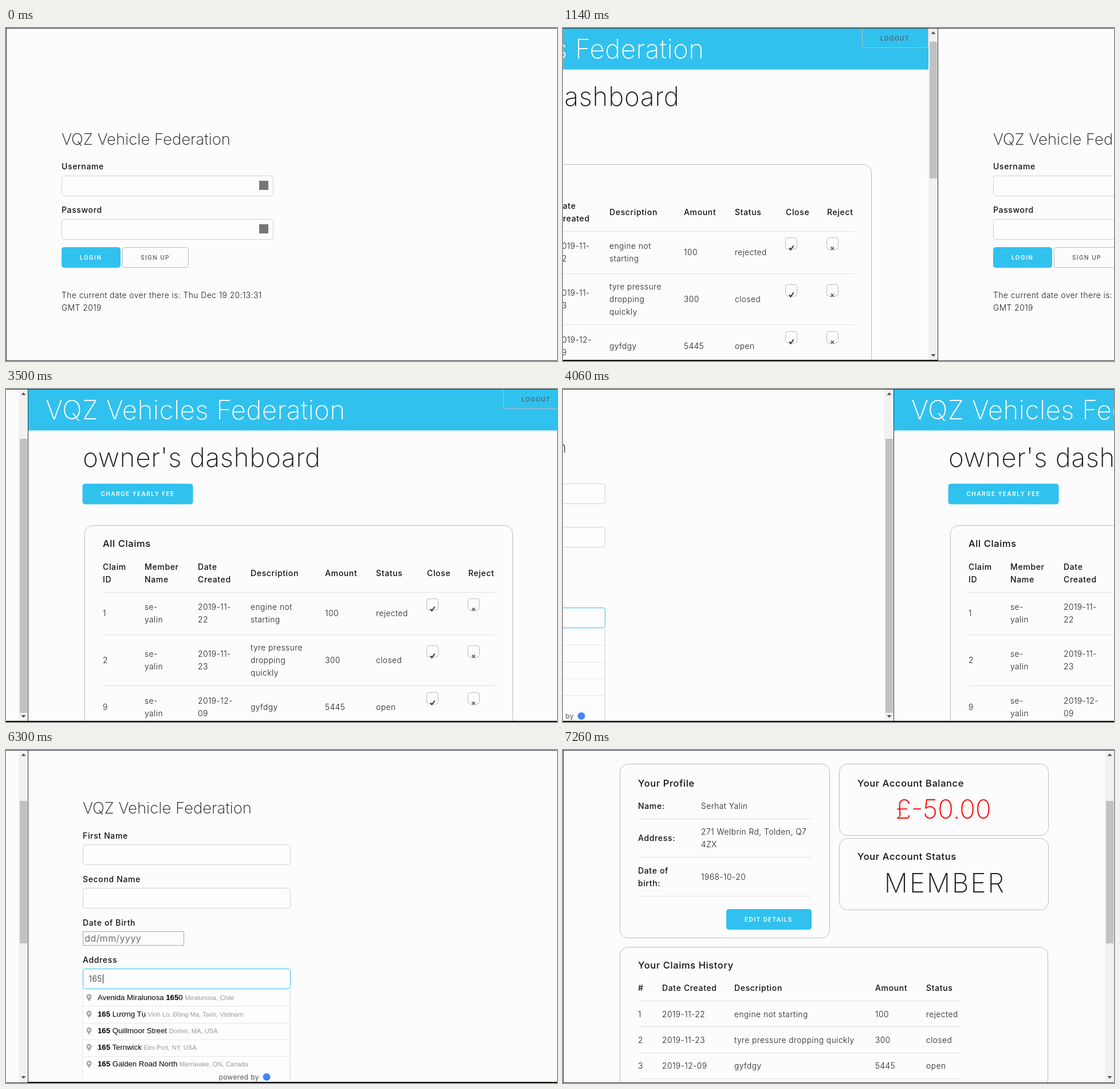
An HTML page for the animation above (8000 ms loop, 962x582 px).

```html
<!DOCTYPE html>
<html lang="en">
<head>
<meta charset="utf-8">
<title>Members portal</title>
<style>
  html, body { margin: 0; width: 100%; height: 100%; overflow: hidden; background: #fcfcfc; }
  svg { display: block; width: 962px; height: 582px; }
  text { font-family: Inter, Lato, sans-serif; fill: #1c1c1c; }
  .body { font-size: 13.8px; font-weight: 300; letter-spacing: .47px; }
  .label { font-size: 14px; font-weight: 500; letter-spacing: .65px; fill: #111; }
  .sub { font-size: 16.5px; font-weight: 500; letter-spacing: .6px; fill: #111; }
  .title { font-size: 27.5px; font-weight: 250; letter-spacing: 0; }
  .big { font-size: 45.8px; font-weight: 250; letter-spacing: .7px; }
  .hero { letter-spacing: .4px; }
  .white { fill: #fff; }
  .status { letter-spacing: 3px; text-anchor: middle; }
  .debt { letter-spacing: 0; fill: #f00; text-anchor: middle; }
  .btn { font-size: 10.1px; font-weight: 500; letter-spacing: 1.4px; fill: #555; }
  .btn.white { font-weight: 600; fill: #fff; }
  .date { font-size: 15.8px; font-weight: 300; letter-spacing: .6px; fill: #444; }
  .place { font: 13.2px "Liberation Sans", Arial, sans-serif; fill: #000; }
  .place .bold { font-weight: 700; }
  .place .area { font-size: 11.2px; fill: #999; }
  .credit { font-size: 12px; letter-spacing: .35px; fill: #555; }
</style>
</head>
<body>
<svg id="stage" viewBox="0 0 962 582"></svg>
<script>
const W = 962, H = 582, LOOP = 8000, STEP = 40, STEPS = 25;
const STARTS = [500, 3500, 6300];
const BLUE = '#31c1ef', DARK = '#2c3135', PAPER = '#fcfcfc', LINE = 22;

const rect = (x, y, w, h, fill) =>
  `<rect x="${x}" y="${y}" width="${w}" height="${h}" fill="${fill}"/>`;
const box = (x, y, w, h, r, stroke, fill = 'none') =>
  `<rect x="${x + .5}" y="${y + .5}" width="${w - 1}" height="${h - 1}" rx="${r}" fill="${fill}" stroke="${stroke}"/>`;
const path = (d, fill, stroke = 'none', width = 1) =>
  `<path d="${d}" fill="${fill}" stroke="${stroke}" stroke-width="${width}"/>`;
const text = (x, y, str, cls = 'body') =>
  `<text x="${x}" y="${y}" class="${cls}">${str}</text>`;

// Lines are centred around the baseline y.
const cell = (x, y, str, cls) => {
  const lines = str.split('|');
  const top = y - (lines.length - 1) * LINE / 2;
  return lines.map((s, i) => text(x, top + i * LINE, s, cls)).join('');
};
const row = (cols, y, cells, cls) => cells.map((s, i) => cell(cols[i], y, s, cls)).join('');
const rules = (x, w, ys) => ys.map(y => rect(x, y, w, 1, '#e1e1e1')).join('');

const input = (x, y, w, stroke = '#d1d1d1') => box(x, y, w, 36, 4, stroke, '#fdfdfd');
const card = (x, y, w, h) => box(x, y, w, h, 14, '#bbb', PAPER);
const button = (x, y, w, str, solid) =>
  box(x, y, w, 36, 4, solid ? BLUE : '#bbb', solid ? BLUE : 'none') +
  text(x + 32, y + 21.5, str, solid ? 'btn white' : 'btn');

const scrollbar = (top, bottom) =>
  rect(946, 1, 16, 580, '#f1f1f1') + rect(948, top, 13, bottom - top, '#c1c1c1') +
  path('M950.5 10.5l4-4.5 4 4.5z', '#505050') + path('M950.5 570l4 4.5 4-4.5z', '#505050');

const page = (id, body, foot) =>
  `<g id="${id}">` + rect(0, 0, W, H, PAPER) + body +
  rect(0, 0, W, 1, DARK) + rect(0, 0, 1, H, DARK) +
  rect(0, H - foot, W, foot, foot > 1 ? '#0c0d0e' : DARK) + '</g>';

function login() {
  const field = (y, name) => text(97, y, name, 'label') + input(97, y + 11, 370) +
    rect(442, y + 20, 16, 16, '#777');
  return text(97, 204, 'VQZ Vehicle Federation', 'title') +
    field(247, 'Username') + field(323, 'Password') +
    button(97, 383, 103, 'LOGIN', true) + button(203, 383, 116, 'SIGN UP') +
    text(97, 472, 'The current date over there is: Thu Dec 19 20:13:31') +
    text(97, 494, 'GMT 2019');
}

function dashboard() {
  const cols = [131, 204, 297, 389, 519, 608, 697, 769];
  const tools = y =>
    box(696, y, 21, 21, 4, '#bbb') + box(768, y, 21, 21, 4, '#bbb') +
    path(`M703 ${y + 18.5}l2.5 3 5-7`, 'none', '#333', 2) +
    path(`M775.5 ${y + 16.5}l5.5 5.5m0-5.5l-5.5 5.5`, 'none', '#444', 1.3);
  return rect(0, 0, 946, 72.5, BLUE) +
    text(31, 53, 'VQZ Vehicles Federation', 'big hero white') +
    box(830, -2, 116, 37, 4, '#bbb') + text(862, 21.5, 'LOGOUT', 'btn') +
    text(96, 136, "owner's dashboard", 'big') +
    button(95.5, 165.5, 193, 'CHARGE YEARLY FEE', true) +
    card(99, 238, 748, 400) + text(131, 276, 'All Claims', 'sub') +
    row(cols, 327, ['Claim|ID', 'Member|Name', 'Date|Created', 'Description',
      'Amount', 'Status', 'Close', 'Reject'], 'label') +
    rules(131, 685, [355, 429, 518]) +
    row(cols, 397, ['1', 'se-|yalin', '2019-11-|22', 'engine not|starting', '100', 'rejected']) +
    row(cols, 479, ['2', 'se-|yalin', '2019-11-|23', 'tyre pressure|dropping|quickly', '300', 'closed']) +
    row(cols, 561, ['9', 'se-|yalin', '2019-12-|09', 'gyfdgy', '5445', 'open']) +
    [366, 448, 530].map(tools).join('') + scrollbar(24, 263);
}

function signup() {
  const x = 96;
  const places = [
    ['Avenida Miralunosa ', '165', '0', 'Miralunosa, Chile'],
    ['', '165', ' Lương Tụ', 'Vinh Lo, Đồng Mạ, Tarin, Vietnam'],
    ['', '165', ' Quillmoor Street', 'Dorlen, MA, USA'],
    ['', '165', ' Ternwick', 'Elm Port, NY, USA'],
    ['', '165', ' Galden Road North', 'Merriwake, ON, Canada']
  ];
  const place = ([before, hit, after, area], i) => {
    const y = 437 + i * 29.1;
    return path(`M107 ${y + 3}c-1-4-4.5-5-4.5-9a4.5 4.5 0 0 1 9 0c0 4-3.5 5-4.5 9z`, '#aaa') +
      `<circle cx="107" cy="${y - 6}" r="1.6" fill="#fff"/>` +
      text(122, y, `${before}<tspan class="bold">${hit}</tspan>${after} <tspan class="area">${area}</tspan>`, 'place');
  };
  return text(x, 111, 'VQZ Vehicle Federation', 'title') +
    text(x, 154.5, 'First Name', 'label') + input(x, 165, 363) +
    text(x, 230.5, 'Second Name', 'label') + input(x, 241, 363) +
    text(x, 306.5, 'Date of Birth', 'label') + box(x, 317, 177, 25, 0, '#a9a9a9') +
    text(99.5, 335, 'dd/mm/yyyy', 'date') +
    text(x, 371.5, 'Address', 'label') + input(x, 382, 363, BLUE) +
    text(106.5, 405, '165') + rect(131, 392, 1, 16, '#222') +
    rect(x - 1, 419, 364, 163, '#e6e6e6') + rect(x, 418, 361, 164, '#fdfdfd') +
    [447, 477, 506, 535].map(y => rect(x, y, 361, 1, '#e6e6e6')).join('') +
    places.map(place).join('') +
    text(333.5, 576, 'powered by', 'credit') +
    '<circle cx="417" cy="571.5" r="6.5" fill="#4285f4"/>' + scrollbar(87, 566);
}

function profile() {
  const cols = [131, 173, 299, 545, 634];
  const pair = (y, key, val) => cell(131, y, key, 'label') + cell(241, y, val);
  return card(99, 24, 367, 305) + text(131, 64, 'Your Profile', 'sub') +
    pair(103, 'Name:', 'Serhat Yalin') +
    pair(159, 'Address:', '271 Welbrin Rd, Tolden, Q7|4ZX') +
    pair(227, 'Date of|birth:', '1968-10-20') +
    rules(131, 303, [120, 187, 255]) +
    button(285, 278, 149, 'EDIT DETAILS', true) +
    card(482, 24, 366, 126) + text(514, 64, 'Your Account Balance', 'sub') +
    text(664, 120, '£-50.00', 'big debt') +
    card(482, 154, 366, 126) + text(514, 192, 'Your Account Status', 'sub') +
    text(667, 249, 'MEMBER', 'big status') +
    card(99, 344, 748, 300) + text(131, 382, 'Your Claims History', 'sub') +
    row(cols, 421, ['#', 'Date Created', 'Description', 'Amount', 'Status'], 'label') +
    rules(131, 563, [438, 483, 529, 574]) +
    row(cols, 466.5, ['1', '2019-11-22', 'engine not starting', '100', 'rejected']) +
    row(cols, 512, ['2', '2019-11-23', 'tyre pressure dropping quickly', '300', 'closed']) +
    row(cols, 557, ['3', '2019-12-09', 'gyfdgy', '5445', 'open']) +
    scrollbar(89, 338);
}

const stage = document.getElementById('stage');
stage.innerHTML = page('login', login(), 1) + page('dashboard', dashboard(), 2) +
  page('signup', signup(), 2) + page('profile', profile(), 1);
const pages = [...stage.children];

// Each new page enters from the left and pushes the old one out to the right.
function draw(time) {
  let current = 0, shift = 0;
  STARTS.forEach((start, i) => {
    if (time < start) return;
    const step = Math.min(STEPS, Math.floor((time - start) / STEP) + 1);
    current = step === STEPS ? i + 1 : i;
    shift = step === STEPS ? 0 : Math.round(W * step / STEPS);
  });
  pages.forEach((el, i) => {
    const entering = i === current + 1 && shift > 0;
    el.style.display = i === current || entering ? '' : 'none';
    el.setAttribute('transform', `translate(${entering ? shift - W : shift} 0)`);
  });
}

const begin = performance.now();
function tick() {
  draw((performance.now() - begin) % LOOP);
  requestAnimationFrame(tick);
}
tick();
</script>
</body>
</html>
```
